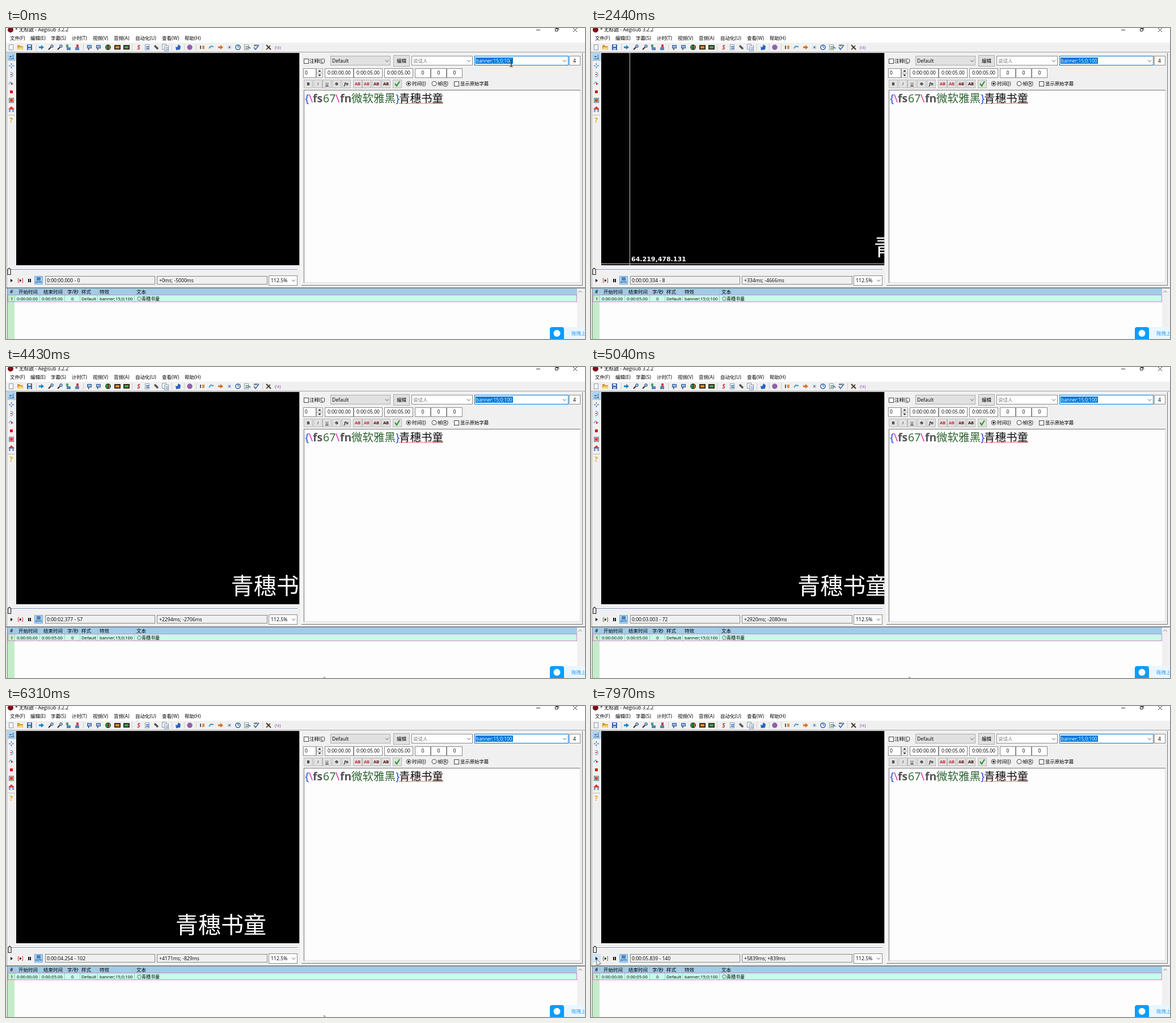
Recreate the animation shown at these times as an HTML page with a canvas. Size 1021 px wide and 548 px high, loop 8 s.

```html
<!DOCTYPE html>
<html lang="zh">
<head>
<meta charset="utf-8">
<title>Subtitle editor</title>
<style>
html, body { margin: 0; width: 100%; height: 100%; overflow: hidden; background: #f0f0f0; }
canvas { display: block; }
</style>
</head>
<body>
<canvas id="stage" width="1021" height="548"></canvas>
<script>
const W = 1021, H = 548, LOOP = 8000, TICK = 1001 / 24;
const SANS = '"Open Sans", "Noto Sans", "Noto Sans CJK SC", sans-serif';
const NAME = '青穗书童';
const VIDEO = { x: 18, y: 44, w: 499.5, h: 374 };
const stage = document.getElementById('stage');
const back = document.createElement('canvas');
back.width = W;
back.height = H;
let g = back.getContext('2d');

function rect(x, y, w, h, fill, edge) {
  if (fill) { g.fillStyle = fill; g.fillRect(x, y, w, h); }
  if (edge) { g.strokeStyle = edge; g.lineWidth = 1; g.strokeRect(x + .5, y + .5, w - 1, h - 1); }
}
function poly(points, fill, edge, width = 1) {
  g.beginPath();
  for (let i = 0; i < points.length; i += 2) g.lineTo(points[i], points[i + 1]);
  if (fill) { g.closePath(); g.fillStyle = fill; g.fill(); }
  if (edge) { g.strokeStyle = edge; g.lineWidth = width; g.stroke(); }
}
function disc(x, y, r, fill, edge, width = 1) {
  g.beginPath();
  g.arc(x, y, r, 0, 7);
  if (fill) { g.fillStyle = fill; g.fill(); }
  if (edge) { g.strokeStyle = edge; g.lineWidth = width; g.stroke(); }
}
// y is the middle of the line
function text(s, x, y, size = 8.5, color = '#000', style = '', align = 'left') {
  g.font = `${style} ${size}px ${SANS}`;
  g.fillStyle = color;
  g.textAlign = align;
  g.fillText(s, x, y + size * .36);
}
const label = (s, x, y, size, color, style) => text(s, x, y, size, color, style, 'center');
const chevron = (x, y) => poly([x - 3, y - 1.5, x, y + 1.5, x + 3, y - 1.5], null, '#555');

// Label followed by an underlined access key
function keyLabel(s, key, x, y) {
  text(`${s}(${key})`, x, y);
  const left = x + g.measureText(s + '(').width;
  rect(left, y + 4, g.measureText(key).width, .8, '#222');
}

function menus() {
  rect(0, 0, W, 26, '#fff');
  disc(8, 3, 5, '#7d1018');
  text('* 无标题 - Aegisub 3.2.2', 16, 3, 8.7);
  poly([935, 3.5, 942, 3.5], null, '#333');
  rect(968, 1, 5, 5, null, '#333');
  poly([969.5, .5, 974.5, .5, 974.5, 4.5], null, '#333');
  poly([1000, 0, 1007, 7], null, '#333');
  poly([1007, 0, 1000, 7], null, '#333');
  [['文件(F)', 7], ['编辑(E)', 43], ['字幕(S)', 79], ['计时(T)', 116], ['视频(V)', 153],
   ['音频(A)', 190], ['自动化(U)', 228], ['查看(W)', 275], ['帮助(H)', 315]]
    .forEach(([s, x]) => text(s, x, 18));
}

function page(x, y, mark) {
  rect(x - 4, y - 5, 8, 10, '#fff', '#8a97a8');
  if (mark) { rect(x - 2, y - 2, 5, 2, mark); rect(x - 2, y + 1, 5, 2, mark); }
}
function lens(x, y) {
  poly([x - 4, y + 4, x, y], null, '#222', 1.8);
  disc(x + 2, y - 2, 2.4, '#9ac4ee', '#334a66');
}
function flag(x, y) {
  rect(x - 4, y - 4, 8, 6, '#8db4e2', '#365a92');
  rect(x - 2, y + 2, 1.5, 3, '#444');
}
function film(x, y, color) {
  rect(x - 6, y - 4, 11, 8, '#382a18');
  rect(x - 4, y - 2, 7, 4, color);
}
function arrow(x, y, color) {
  poly([x - 4, y - 1.5, x, y - 1.5, x, y - 4, x + 5, y, x, y + 4, x, y + 1.5, x - 4, y + 1.5], color);
}

function toolbar() {
  const y = 34;
  rect(0, 26, W, 16, '#f0f0f0');
  rect(0, 42, W, 1, '#a0a0a0');
  [53, 136, 222, 292, 314, 335, 452].forEach(x => rect(x, 28, 1, 12, '#cfcfcf'));
  page(9, y);
  poly([20, 30, 24, 30, 25, 32, 30, 32, 30, 38, 20, 38], '#d99a2b');
  poly([22, 34, 31, 34, 29, 38, 20, 38], '#f5d67a');
  rect(37, 29, 9, 10, '#2f62b5');
  rect(39, 30, 5, 3, '#e9eef7');
  rect(39, 35, 5, 4, '#a9c0e6');
  arrow(62, y, '#1687c9');
  lens(79, y);
  lens(95, y);
  rect(106, 29, 4, 5, '#49a078');
  rect(107, 34, 7, 5, '#5686b8');
  rect(124, 29, 4, 5, '#c8464a');
  rect(122, 34, 7, 5, '#5686b8');
  flag(147, y);
  flag(163, y);
  disc(180, y, 4.8, '#123f23');
  rect(177, 31, 2, 6, '#36b35c');
  rect(181, 31, 2, 6, '#d6762c');
  film(197, y, '#e78c24');
  film(213, y, '#32ac62');
  label('S', 234, y, 10, '#cf2334', 'italic bold');
  page(249, y, '#4680c8');
  poly([262, 31, 268, 37], null, '#555', 3.5);
  page(279, 33);
  page(283, 36, '#8bb2de');
  poly([299, 33, 302, 34, 304, 29, 308, 32, 307, 38, 300, 39], '#2b62c4');
  disc(324, y, 4.7, '#9360a8');
  rect(342, 31, 2, 6, '#555');
  rect(346, 31, 4, 6, '#d79348');
  poly([358, 36, 361, 32, 366, 33], null, '#3a9ac2', 2);
  arrow(378, y, '#dd6b20');
  rect(391, 31, 6, 6, '#c3d2e2');
  rect(393, 33, 2, 2, '#234f91');
  disc(409, y, 4, '#fff', '#2563ae', 1.6);
  poly([409, 31, 409, 34, 411, 34], null, '#333');
  page(424, y, '#78a56c');
  poly([427, 33, 431, 36], null, '#477cc0', 2);
  label('ABC', 441, 31, 4, '#333', 'bold');
  poly([437, 34, 440, 38, 446, 30], null, '#3169b7', 1.6);
  poly([459, 38, 466, 31], null, '#795322', 2);
  poly([459, 30, 467, 38], null, '#333', 2);
  text('(\\t)', 474, y, 8, '#8a35b5');
}

function sideTools() {
  rect(0, 43, 18, 414, '#f0f0f0');
  rect(1, 43, 1, 415, '#aaa');
  rect(3, 44, 14, 14, '#b5d7f2', '#90c4ec');
  poly([5, 54.5, 14, 54.5], null, '#3c5270');
  poly([12.5, 47, 12.5, 54], null, '#3c5270');
  rect(6, 49, 4, 3, '#5289bd');
  poly([5, 66.5, 14, 66.5], null, '#3b7fd0', 1.5);
  poly([9.5, 62, 9.5, 71], null, '#3b7fd0', 1.5);
  disc(9.5, 66.5, 1.4, '#fff');
  g.beginPath();
  g.arc(8, 82, 4, -1.7, 1.7);
  g.strokeStyle = '#5688c7';
  g.lineWidth = 1.2;
  g.stroke();
  rect(8, 81, 2, 2, '#d22');
  poly([5, 99, 8, 95, 13, 99], null, '#5688c7', 1.2);
  rect(9, 97, 2, 3, '#d22');
  rect(7, 110, 5, 5, '#e21616');
  rect(5, 123, 9, 9, '#f1b9b0', '#597eaf');
  rect(7, 125, 5, 5, '#d73f3b');
  poly([4, 143, 9.5, 138, 15, 143], '#c94334');
  rect(5, 143, 9, 5, '#7c99c2');
  rect(8, 144, 3, 4, '#fff');
  rect(3, 153, 13, 1, '#bbb');
  label('?', 9, 163, 12, '#e7a711', 'bold');
}

function field(x, w, s) {
  rect(x, 71, w, 17, '#fff', '#8b8b8b');
  label(s, x + w / 2, 79);
}
function button(x, s, color, style) {
  rect(x - 8, 91, 16, 15, '#e1e1e1', '#b8b8b8');
  label(s, x, 98.5, 7.5, color, style);
}
function checkbox(x, y) { rect(x, y, 9, 9, '#fff', '#444'); }
function radio(x, y) { disc(x, y, 4, '#fff', '#333', .9); }

function editBox() {
  rect(518, 43, 503, 415, '#f0f0f0');
  rect(520, 44, 1, 409, '#fff');
  rect(1016, 44, 1, 410, '#777');
  rect(521, 453, 496, 1, '#777');
  checkbox(525, 54);
  keyLabel('注释', 'C', 535, 58);
  rect(572, 49, 106, 17, '#e1e1e1', '#adadad');
  text('Default', 575, 58, 8.6);
  chevron(672, 58);
  rect(683, 48, 29, 20, '#e1e1e1', '#adadad');
  label('编辑', 697.5, 58);
  rect(715, 49, 108, 17, '#fff', '#8b8b8b');
  text('说话人', 718, 58, 8.5, '#777');
  chevron(816, 58);
  rect(826, 49, 166, 17, '#fff', '#0078d7');
  rect(828, 52, 66, 11, '#0078d7');
  text('banner;15;0;100', 829, 57.5, 8.4, '#fff');
  chevron(985, 58);
  rect(993, 49, 20, 17, '#fff', '#8b8b8b');
  label('4', 1002.5, 58);

  rect(524, 71, 23, 17, '#fff', '#8b8b8b');
  text('0', 527, 79);
  rect(547, 71, 12, 17, '#eee', '#aaa');
  rect(547, 79, 12, 1, '#aaa');
  poly([550.5, 77, 553, 74, 555.5, 77], '#222');
  poly([550.5, 82, 553, 85, 555.5, 82], '#222');
  field(562, 51, '0:00:00.00');
  field(613, 51, '0:00:05.00');
  field(667, 51, '0:00:05.00');
  [721, 749, 777].forEach(x => field(x, 28, '0'));

  button(533, 'B', '#111', 'bold');
  button(550, 'I', '#111', 'italic');
  button(566, 'U');
  rect(563, 102, 6, 1, '#111');
  button(583, 'S', '#111', 'bold');
  rect(580, 98, 6, 1, '#111');
  button(600, 'fn', '#111', 'italic bold');
  button(620, 'AB', '#c5202d', 'bold');
  button(636, 'AB', '#bd3640', 'bold');
  button(653, 'AB', '#6f1018', 'bold');
  button(670, 'AB', '#3c0a0d', 'bold');
  button(690, '');
  poly([686, 98, 689, 102, 694, 94], null, '#2f9c2d', 2.2);
  radio(710, 98);
  disc(710, 98, 2, '#222');
  keyLabel('时间', 'I', 716, 98);
  radio(755, 98);
  keyLabel('帧', 'R', 761, 98);
  checkbox(790, 94);
  text('显示原始字幕', 801, 98, 8.4);

  rect(525, 109, 488, 340, '#fdfdfd', '#dedede');
  rect(525, 109, 488, 1, '#777');
  rect(525, 109, 1, 340, '#777');
  [['{', 527, '#2346d8'], ['\\', 534, '#e026b8'], ['fs', 541, '#555', 'bold'], ['67', 559, '#2e6431'],
   ['\\', 581, '#e026b8'], ['fn', 589, '#555', 'bold'], ['微软雅黑', 609, '#2e6431'],
   ['}', 687, '#2346d8'], [NAME, 693, '#111']]
    .forEach(([s, x, c, style]) => text(s, x, 124, 19.5, c, style));
  const wave = [];
  for (let x = 693; x <= 771; x += 1.5) wave.push(x, 132.5 + (wave.length % 4 ? 1 : -.5));
  poly(wave, null, '#dc3b32', .8);
}

function playerBar() {
  rect(2, 418, 516, 39, '#f0f0f0');
  rect(3, 424, 511, 3, '#fff');
  rect(3, 425, 511, 1, '#7a88b5');
  rect(39, 442, 2, 6, '#111');
  rect(42, 442, 2, 6, '#111');
  rect(50, 437, 15, 15, '#a9d2f3', '#6baade');
  rect(54, 439, 7, 6, '#5481b1');
  label('AUTO', 57.5, 448, 4, '#174c87', 'bold');
  rect(69, 437, 194, 15, '#f0f0f0', '#858585');
  rect(266, 437, 195, 15, '#f0f0f0', '#858585');
  rect(463, 436, 51, 18, '#fff', '#8b8b8b');
  text('112.5%', 467, 445, 8.7);
  chevron(507, 445);
}

function grid() {
  rect(0, 457, W, 91, '#fdfdfd');
  rect(0, 457, W, 2, '#858b90');
  rect(0, 459, 3, 89, '#e7e7e7');
  rect(2, 458, 1, 90, '#858585');
  rect(3, 459, 1004, 12, '#a2cbe6');
  rect(3, 471, 1004, 12, '#c9fbe8');
  rect(3, 471, 12, 77, '#c4ecc9');
  [15, 59, 103, 130, 161, 226].forEach(x => rect(x, 459, 1, 24, '#a4c8c9'));
  rect(3, 470, 1004, 13, null, '#d486cf');
  [['#', 7], ['开始时间', 22], ['结束时间', 66], ['字/秒', 108], ['样式', 133], ['特效', 165], ['文本', 230]]
    .forEach(([s, x]) => text(s, x, 465));
  [['1', 8], ['0:00:00.00', 19], ['0:00:05.00', 63], ['0', 115], ['Default', 133],
   ['banner;15;0;100', 165]].forEach(([s, x]) => text(s, x, 477, 7.7));
  text('◎' + NAME, 231, 477, 8);
  rect(1007, 459, 14, 89, '#f0f0f0');
  poly([1009.5, 466, 1012.5, 463, 1015.5, 466], null, '#777');
  rect(980, 527, 41, 21, '#e9f6ff');
  g.beginPath();
  g.roundRect(959, 527, 25, 26, 4);
  g.fillStyle = '#0b9cff';
  g.fill();
  disc(971.5, 538, 6, '#fff');
  text('拖拽上', 997, 538, 8.5, '#2a9df0');
}

// Pointer keys: time, x, y
const PATH = [
  [40, 891, 62], [300, 700, 170], [520, 510, 290], [700, 150, 410], [810, 26, 447], [1200, 5, 447],
  [2150, 6, 447], [2400, 60, 415], [2900, 481, 393], [3150, 557, 521], [3300, 557, 521],
  [3700, 561, 546], [5000, 561, 546], [5400, 561, 545], [6420, 561, 545], [6560, 480, 511],
  [7000, 39, 489], [7340, 24, 470], [7700, 10, 446]
];
function pointer(t) {
  const i = PATH.findIndex(k => k[0] > t);
  if (i === 0) return PATH[0].slice(1);
  if (i < 0) return PATH[PATH.length - 1].slice(1);
  const [a, ax, ay] = PATH[i - 1], [b, bx, by] = PATH[i];
  const p = (t - a) / (b - a), e = p * p * (3 - 2 * p);
  return [ax + (bx - ax) * e, ay + (by - ay) * e];
}
const within = (x, y, l, t, r, b) => x >= l && x < r && y >= t && y < b;
const inVideo = ([x, y]) => within(x, y, 18, 44, 517, 418);

// Playback stalls while the pointer crosses the video.
function playFrame(t) {
  const ms = t < 3280 ? Math.min(t - 2060, 340) : t - 2030;
  return Math.min(140, Math.max(0, Math.floor(ms / TICK)));
}

function drawPointer(x, y) {
  if (within(x, y, 716, 48, 990, 68) || within(x, y, 526, 111, 1010, 447)) {
    poly([x, y - 6, x, y + 6], null, '#222', 1.3);
    poly([x - 3, y - 6, x + 3, y - 6], null, '#222');
    poly([x - 3, y + 6, x + 3, y + 6], null, '#222');
    return;
  }
  poly([x, y, x, y + 11, x + 2.5, y + 8.8, x + 4.3, y + 12.7, x + 6, y + 12, x + 4.3, y + 8.2,
    x + 7.7, y + 8, x, y], '#fff', '#555', .8);
}

function crosshair([x, y]) {
  x = Math.round(x);
  y = Math.round(y);
  rect(x, VIDEO.y, 1, VIDEO.h, '#ccc');
  rect(VIDEO.x, y, VIDEO.w, 1, '#ccc');
  const sx = (x - VIDEO.x) * 594.667 / 463, sy = (y - VIDEO.y) * 449.778 / 349;
  const left = x > 268, below = y < 230;
  g.font = 'bold 11px "DejaVu Sans", sans-serif';
  g.textAlign = left ? 'right' : 'left';
  g.fillStyle = '#fff';
  g.fillText(`${sx.toFixed(3)},${sy.toFixed(3)}`, x + (left ? -1 : 3), y + (below ? 13 : -4));
}

function drawVideo(t, ms) {
  g.save();
  g.beginPath();
  g.rect(VIDEO.x, VIDEO.y, VIDEO.w, VIDEO.h);
  g.clip();
  rect(VIDEO.x, VIDEO.y, VIDEO.w, VIDEO.h, '#000');
  if (ms < 5000) text(NAME, 516 - ms * .052, 386, 40, '#fff');
  const stalled = t >= 2400 && t < 3280;
  const p = pointer(stalled ? Math.min(t, 2900) : t);
  if (inVideo(p)) crosshair(p);
  g.restore();
}

const signed = n => (n < 0 ? '' : '+') + n;

function draw(t) {
  const frame = playFrame(t);
  const lag = frame > 8 && frame < 140 ? (frame % 5 ? 2 : 1) : 0;
  const now = Math.round(frame * TICK), shown = Math.round((frame - lag) * TICK);
  g.drawImage(back, 0, 0);
  drawVideo(t, shown);

  const knob = 5.5 + frame / 100;
  poly([knob - 2.5, 425.5, knob, 423, knob + 2.5, 425.5, knob + 2.5, 434.5, knob - 2.5, 434.5,
    knob - 2.5, 425.5], '#fff', '#222', 1.2);

  if (t > 1300 && t < 2250 || t > 7600) rect(3, 437, 14, 15, '#cce4f7');
  if (t > 780 && t <= 1300) rect(17, 437, 17, 15, '#d5e6f4');
  poly([8, 442, 12, 445, 8, 448], '#111');
  poly([24, 442.5, 27.5, 445, 24, 447.5], '#111');
  poly([23, 441.5, 21.5, 441.5, 21.5, 448.5, 23, 448.5], null, '#d23a31');
  poly([28, 441.5, 29.5, 441.5, 29.5, 448.5, 28, 448.5], null, '#d23a31');

  text(`0:00:0${(now / 1000).toFixed(3)} - ${frame}`, 72, 445, 8.6);
  text(`${signed(shown)}ms; ${signed(shown - 5000)}ms`, 270, 445, 8.6);

  const p = pointer(t);
  if (!inVideo(p)) drawPointer(...p);
}

rect(0, 0, W, H, '#f0f0f0');
menus();
toolbar();
sideTools();
editBox();
playerBar();
grid();

g = stage.getContext('2d');
let start;
function tick(time) {
  start ??= time;
  draw((time - start) % LOOP);
  requestAnimationFrame(tick);
}
draw(0);
requestAnimationFrame(tick);
</script>
</body>
</html>
```
